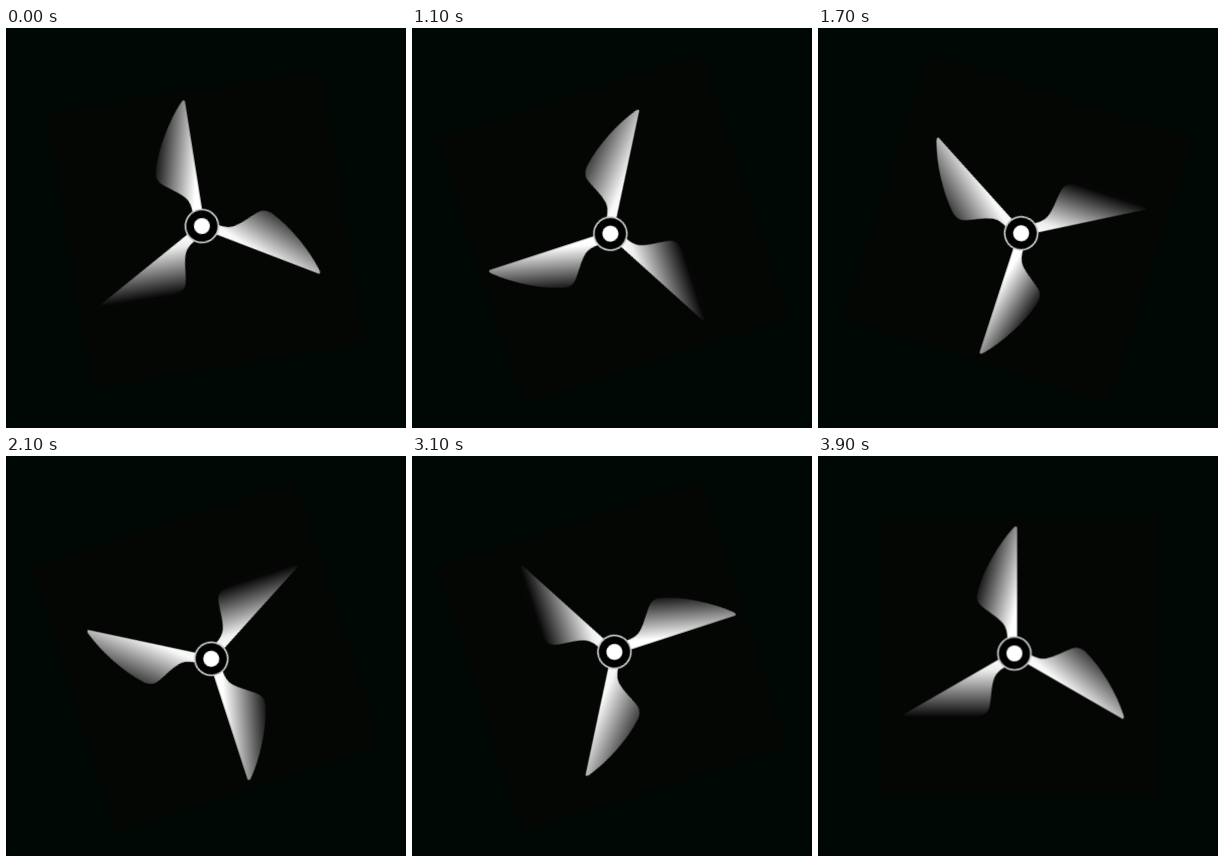
Write an HTML page that moves like this. It is 400 px wide and 400 px high and loops after 4000 ms.

```html
<!DOCTYPE html>
<html lang="en">
<head>
<meta charset="utf-8">
<title>Propeller</title>
<style>
  html, body { margin: 0; width: 100%; height: 100%; overflow: hidden; background: #000806; }
  svg { display: block; width: 100vw; height: 100vh; }
  #rotor { transform-origin: 200.4px 200.8px; }
  #propeller { filter: blur(.5px); }
</style>
</head>
<body>
<svg viewBox="0 0 400 400">
  <defs>
    <linearGradient id="top" gradientUnits="userSpaceOnUse" x1="-38" y1="-58" x2="2" y2="-48">
      <stop offset="0" stop-color="#181818"/>
      <stop offset="1" stop-color="#fff"/>
    </linearGradient>
    <linearGradient id="right" gradientUnits="userSpaceOnUse" x1="-39" y1="-64" x2="3" y2="-56">
      <stop offset="0" stop-color="#343434"/>
      <stop offset="1" stop-color="#f8f8f8"/>
    </linearGradient>
    <linearGradient id="left" gradientUnits="userSpaceOnUse" x1="-4" y1="-2.5" x2="-55" y2="-32">
      <stop offset="0" stop-color="#fff"/>
      <stop offset=".2" stop-color="#eee"/>
      <stop offset="1" stop-color="#050605"/>
    </linearGradient>
    <path id="blade" d="M2.7-14V-125.5Q2.7-127.3 1.5-127Q0-127-1.5-125C-15-110-31-84-37.2-60Q-38.6-53-34.5-49C-28-42.5-17-37-11-29.5Q-7-24.5-7-14Z"/>
  </defs>
  <g id="rotor">
    <rect x="60.4" y="60.8" width="280" height="280" fill="#040604"/>
    <g id="propeller" transform="translate(196.4 197.4)">
      <use href="#blade" fill="url(#top)"/>
      <use href="#blade" fill="url(#right)" transform="rotate(120)"/>
      <use href="#blade" fill="url(#left)" transform="rotate(240)"/>
      <circle r="16.5" fill="#000" stroke="#c8cccc" stroke-width="1.7"/>
      <circle r="8" fill="#fff"/>
    </g>
  </g>
</svg>
<script>
  const step = 9;
  const turn = deg => ({ transform: `rotate(${deg}deg)` });
  const spin = document.getElementById('rotor').animate(
    [turn(-step), turn(-step - 360)],
    { duration: 4000, iterations: Infinity, easing: `steps(${360 / step}, end)` }
  );
  spin.startTime = 0;
</script>
</body>
</html>
```
